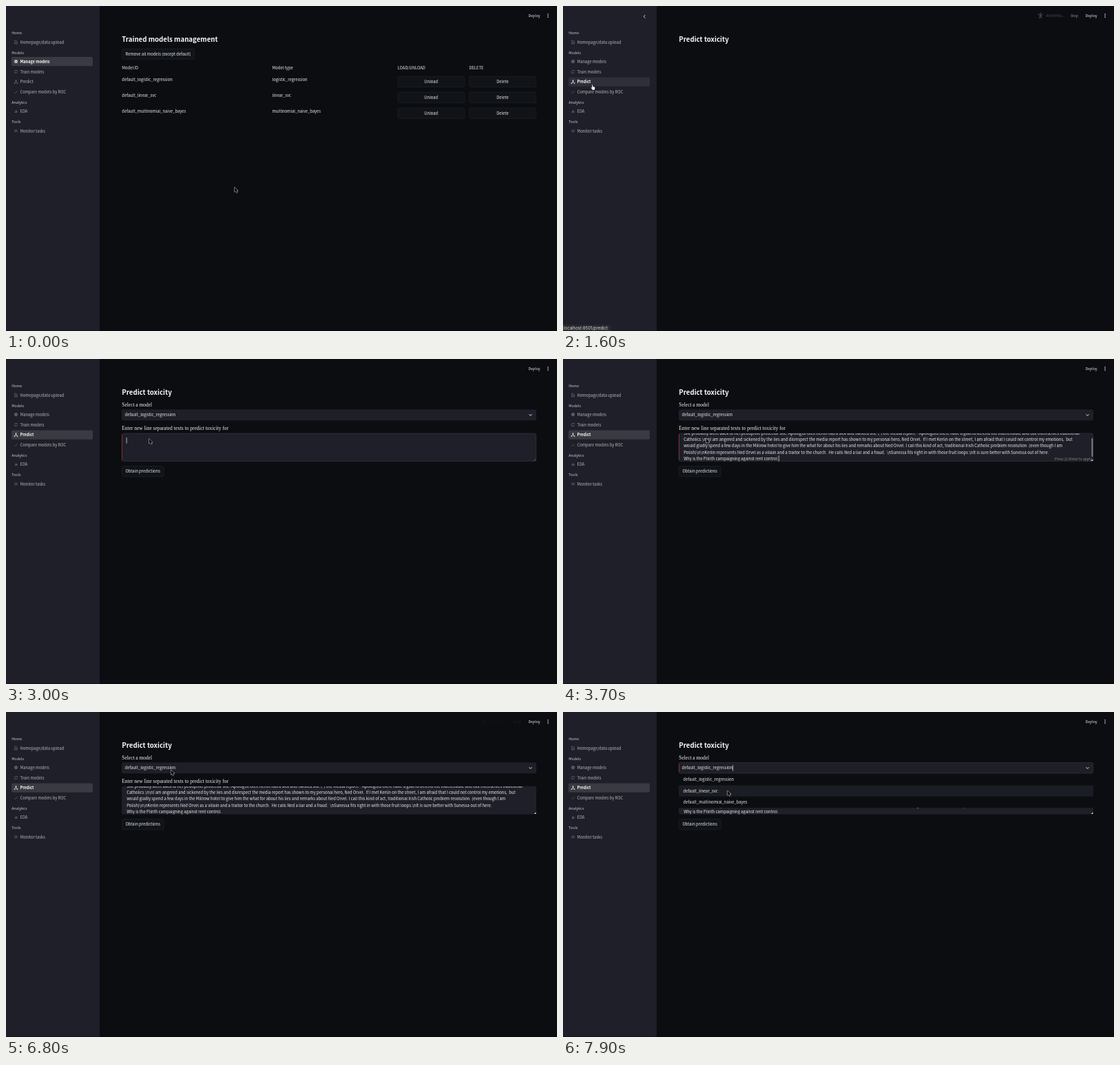
Animation of 800x472 px, one loop 8 s. Source, as an HTML page with a canvas:

```html
<!DOCTYPE html>
<html lang="en">
<head>
<meta charset="utf-8">
<title>Model dashboard</title>
<style>
html, body { margin: 0; width: 100%; height: 100%; overflow: hidden; background: #0c0d11; }
canvas { display: block; width: 800px; height: 472px; }
</style>
</head>
<body>
<canvas id="stage"></canvas>
<script>
const LOOP = 8000, STEP = 100;
const SANS = '"Noto Sans CJK JP", "Noto Sans CJK SC", "Noto Sans CJK", "Open Sans", sans-serif';
const SERIF = '"Liberation Serif", serif';
const UI = 'Inter, sans-serif';
const C = {
  page: '#0c0d11', side: '#1e1f28', field: '#1e1f28', text: '#f2f2f4',
  soft: '#b8b9bf', button: '#101318', edge: '#22252b', red: '#dd3f43'
};

const canvas = document.getElementById('stage');
const dpr = window.devicePixelRatio || 1;
canvas.width = 800 * dpr;
canvas.height = 472 * dpr;
const ctx = canvas.getContext('2d');

// Fonts are set ten times larger and scaled down to keep exact advances.
function label(str, x, y, o = {}) {
  const { size = 5.83, weight = 400, font = SANS, color = C.text, align = 'left' } = o;
  ctx.save();
  ctx.translate(x, y);
  ctx.scale(0.1, 0.1);
  ctx.font = `${weight} ${size * 10}px ${font}`;
  ctx.textAlign = align;
  ctx.fillStyle = color;
  ctx.fillText(str, 0, 0);
  const width = ctx.measureText(str).width / 10;
  ctx.restore();
  return width;
}

function rect(x, y, w, h, color) {
  ctx.fillStyle = color;
  ctx.fillRect(x, y, w, h);
}

function box(x, y, w, h, r, fill, stroke, line = 0.6) {
  ctx.beginPath();
  ctx.roundRect(x, y, w, h, r);
  if (fill) { ctx.fillStyle = fill; ctx.fill(); }
  if (stroke) { ctx.strokeStyle = stroke; ctx.lineWidth = line; ctx.stroke(); }
}

function path(points, color, width, close) {
  ctx.beginPath();
  points.forEach(([x, y]) => ctx.lineTo(x, y));
  if (close) ctx.closePath();
  ctx.strokeStyle = color;
  ctx.lineWidth = width;
  ctx.stroke();
}

function dot(x, y, r, color) {
  ctx.beginPath();
  ctx.arc(x, y, r, 0, Math.PI * 2);
  ctx.fillStyle = color;
  ctx.fill();
}

function ring(x, y, r, color, width, from = 0, to = Math.PI * 2) {
  ctx.beginPath();
  ctx.arc(x, y, r, from, to);
  ctx.strokeStyle = color;
  ctx.lineWidth = width;
  ctx.stroke();
}

function button(str, x, y, w, h, hot) {
  box(x + 0.3, y + 0.3, w - 0.6, h - 0.6, 2.5, C.button, hot ? '#6e3539' : C.edge);
  label(str, x + w / 2, y + h / 2 + 2.1, { align: 'center', color: hot ? C.red : C.text });
}

// Pointer position keys: time, x, y
const MOVES = [
  [0, 332, 263], [100, 332, 258.5], [400, 332, 258.5], [500, 322, 247], [700, 240, 192],
  [900, 128, 138], [1100, 62, 119], [1300, 41, 114], [1700, 41, 114], [1800, 43, 122],
  [1900, 52, 138], [2000, 92, 156], [2100, 211, 180], [2200, 221, 150], [2300, 214, 132],
  [2400, 211, 126], [2700, 208.5, 118], [3100, 207.8, 115], [3800, 207.8, 115],
  [4000, 208.5, 121], [4300, 212, 149], [4500, 214.5, 160], [4700, 215, 163],
  [4900, 215.5, 163], [6100, 215.5, 163], [6300, 220, 152], [6500, 231, 114],
  [6700, 239, 87], [6800, 239.5, 84], [7000, 240, 80], [7300, 240, 81],
  [7500, 240, 98], [7700, 239.5, 110], [7900, 239, 114]
];

function pointerAt(t) {
  const i = MOVES.findIndex(m => m[0] > t);
  if (i < 0) return MOVES[MOVES.length - 1].slice(1);
  const a = MOVES[i - 1], b = MOVES[i], k = (t - a[0]) / (b[0] - a[0]);
  return [a[1] + (b[1] - a[1]) * k, a[2] + (b[2] - a[2]) * k];
}

function drawArrow(x, y) {
  ctx.save();
  ctx.translate(x, y);
  ctx.lineJoin = 'round';
  const shape = [[0, 0], [0, 7.2], [1.7, 5.7], [2.8, 8.2], [4, 7.7], [2.9, 5.2], [5, 5.2]];
  path(shape, '#e8e8ea', 0.9, true);
  ctx.fillStyle = '#08080a';
  ctx.fill();
  ctx.restore();
}

function drawHand(x, y) {
  ctx.save();
  ctx.translate(x, y);
  ctx.lineJoin = 'round';
  path([[1, 0.5], [1.9, 0.3], [2.4, 3], [4.3, 3.4], [5.4, 4.2], [5.3, 6.2], [4.6, 8],
        [2, 8], [0.9, 6.4], [-0.7, 4.6], [0, 4.1], [1.2, 4.9]], '#0a0a0c', 0.8, true);
  ctx.fillStyle = '#f4f4f6';
  ctx.fill();
  ctx.restore();
}

const ICONS = {
  doc(y, c) {
    path([[12.6, y - 2.4], [15, y - 2.4], [16.4, y - 1], [16.4, y + 2.4], [12.6, y + 2.4]], c, 0.6, true);
    path([[13.5, y + 0.2], [15.5, y + 0.2]], c, 0.5);
    path([[13.5, y + 1.3], [15.5, y + 1.3]], c, 0.5);
  },
  gear(y, c) {
    ring(14.5, y, 1.5, c, 1.2);
    for (let i = 0; i < 8; i++) {
      const a = i * Math.PI / 4;
      dot(14.5 + 2.2 * Math.cos(a), y + 2.2 * Math.sin(a), 0.5, c);
    }
  },
  cycle(y, c) {
    ring(14.5, y, 2.1, c, 0.7, 0.3, 2.6);
    ring(14.5, y, 2.1, c, 0.7, 3.2, 5.7);
    dot(16.4, y - 1.3, 0.6, c);
    dot(12.6, y + 1.2, 0.6, c);
  },
  hub(y, c) {
    for (const [dx, dy] of [[0, -2], [-2, 1.8], [2, 1.8]]) {
      path([[14.5, y], [14.5 + dx, y + dy]], c, 0.6);
      dot(14.5 + dx, y + dy, 0.85, c);
    }
    dot(14.5, y, 0.8, c);
  },
  curve(y, c) { path([[12.4, y + 0.8], [13.6, y + 1.4], [16.6, y - 1.8]], c, 0.6); },
  bars(y, c) {
    [1.6, 3.6, 2.6].forEach((h, i) => rect(12.7 + i * 1.4, y + 1.9 - h, 0.8, h, c));
  },
  list(y, c) {
    for (const d of [-1.3, 0, 1.3]) path([[12.2, y + d], [16.8, y + d]], c, 0.5);
  }
};

const SECTIONS = [['Home', 39.3], ['Models', 67.5], ['Analytics', 139.7], ['Tools', 168]];
const PAGES = [
  ['Homepage/data upload', 52.5, 'doc'], ['Manage models', 80.6, 'gear'],
  ['Train models', 95.5, 'cycle'], ['Predict', 110.2, 'hub'],
  ['Compare models by ROC', 125, 'curve'], ['EDA', 153, 'bars'], ['Monitor tasks', 181.4, 'list']
];

function drawSidebar(t, px, py) {
  rect(0, 0, 136, 472, C.side);
  SECTIONS.forEach(([s, y]) => label(s, 8.2, y + 2, { size: 5.3, weight: 500, color: '#d0d1d5' }));
  const active = t < 1500 ? 1 : 3;
  const inside = t >= 900 && t < 2100;
  PAGES.forEach(([s, y, icon], i) => {
    const on = i === active;
    const hover = inside && px < 126 && Math.abs(py - y) < 7;
    if (on) box(8, y - 6.6, 118, 13.2, 2, hover || (inside && t >= 1500 && t < 1900) ? '#302f39' : '#393a42');
    else if (hover) box(8, y - 6.6, 118, 13.2, 2, '#282932');
    ICONS[icon](y, on ? '#f2f2f4' : '#74757c');
    label(s, 20.5, y + 2.1, on
      ? { weight: 700, size: 5.6, color: '#ffffff' }
      : { color: C.soft, size: 5.78 });
  });
  if (inside) path([[119.3, 13], [117.3, 15.3], [119.3, 17.6]], '#e4e4e8', 0.9);
}

function drawRunning(alpha) {
  ctx.save();
  ctx.globalAlpha = alpha;
  const c = '#4a4b51';
  dot(693.3, 10.6, 1, c);
  path([[689.8, 11.8], [692, 13], [694.6, 13], [696.8, 11.8]], c, 1.1);
  path([[693.3, 12.5], [693.3, 15]], c, 2);
  path([[691.6, 18], [692.7, 14.8], [694, 14.8], [695, 18]], c, 1.1);
  label('RUNNING...', 701.5, 15.8, { size: 5.15, color: c });
  label('Stop', 737, 15.9, { size: 5.05, color: '#9a9ba0' });
  ctx.restore();
}

function drawTopBar(t) {
  if (t >= 1500 && t < 1900) drawRunning(1);
  if (t >= 6700 && t < 7000) drawRunning(0.12);
  label('Deploy', 758.5, 16, { size: 5.2, weight: 500 });
  for (const d of [-2.2, 0, 2.2]) dot(787, 14 + d, 0.75, '#e6e6ea');
}

const heading = s => label(s, 168.2, 51.8, { size: 9.7, weight: 700, color: '#fafafa' });

const MODELS = ['logistic_regression', 'linear_svc', 'multinomial_naive_bayes'];

function drawManage() {
  heading('Trained models management');
  button('Remove all models (except default)', 168, 62, 106, 15.6);
  [['Model ID', 168.3], ['Model type', 386.6], ['LOAD/UNLOAD', 568.6], ['DELETE', 672.4]]
    .forEach(([s, x]) => label(s, x, 91.8));
  MODELS.forEach((m, i) => {
    const y = i * 22.9;
    label('default_' + m, 168.3, 108.9 + y);
    label(m, 386.6, 108.9 + y);
    button('Unload', 568.5, 102 + y, 97.5, 16);
    button('Delete', 672.3, 102 + y, 97.5, 16);
  });
}

const PASTED = [
  'She probably went back to her pedophile protector site. Apologist Glen Kerlin has a sick and twisted site \\"( the media report."  Apologists there have a goal to defend the indefensible and call themselves traditional',
  'Catholics.\\n\\nI am angered and sickened by the lies and disrespect the media report has shown to my personal hero, Ned Orvel.  If I met Kerlin on the street, I am afraid that I could not control my emotions,  but',
  'would gladly spend a few days in the Millrow hotel to give him the what for about his lies and remarks about Ned Orvel. I call this kind of act, traditional Irish Catholic problem resolution. (even though I am',
  'Polish)\\n\\nKerlin represents Ned Orvel as a villain and a traitor to the church.  He calls Ned a liar and a fraud.  \\nSunessa fits right in with those fruit loops.\\nIt is sure better with Sunessa out of here.',
  'Why is the Plinth campaigning against rent control.'
];

function focusEdge(x, y, w, h) {
  box(x + 0.3, y + 0.3, w - 0.6, h - 0.6, 2.5, null, '#34343c', 0.6);
  rect(x, y + 2, 0.7, h - 4, '#a8343a');
}

const caret = (x, y) => rect(x, y, 0.7, 8.6, '#f0f0f2');
const within = (t, spans) => spans.some(([a, b]) => t >= a && t < b);

function drawTextArea(t) {
  const focused = t >= 2600 && t < 6200, filled = t >= 3700;
  box(168, 107.8, 602, 40.9, 2.5, C.field);
  if (focused) focusEdge(168, 107.8, 602, 40.9);
  let caretX = 174.7, caretY = 114;
  if (filled) {
    ctx.save();
    ctx.beginPath();
    ctx.rect(168, 108, 602, 40.5);
    ctx.clip();
    PASTED.forEach((s, i) => {
      caretX = 175.2 + label(s, 175.2, 109.9 + i * 9.2);
    });
    ctx.restore();
    caretY = 140.2;
    if (focused) label('Press ⌘+Enter to apply', 768, 146.5, { size: 5, color: '#8d8e94', align: 'right' });
    const bar = t < 3900 ? 1 : Math.max(0, 1 - (t - 3800) / 400);
    if (bar) box(767.4, 115, 2, 27, 1, `rgba(125,126,131,${bar})`);
  }
  if (within(t, [[2600, 3100], [3500, 5100], [5600, 6100]])) caret(caretX, caretY);
  if (filled) {
    ctx.beginPath();
    ctx.moveTo(769.4, 145.4);
    ctx.lineTo(769.4, 148);
    ctx.lineTo(766.8, 148);
    ctx.fillStyle = '#e8e8ea';
    ctx.fill();
  } else {
    path([[766, 148], [769.2, 144.8]], '#77787e', 0.5);
    path([[767.8, 148], [769.2, 146.6]], '#77787e', 0.5);
  }
}

function drawSelect(open, t) {
  box(168, 73.2, 602, 16, 2.5, C.field);
  if (open) focusEdge(168, 73.2, 602, 16);
  const w = label('default_' + MODELS[0], 172.6, 83.3);
  if (open && within(t, [[6900, 7400], [7900, 8000]])) caret(172.9 + w, 77);
  path([[759.6, 80.3], [761.5, 82.3], [763.4, 80.3]], '#ececf0', 1);
}

function drawMenu(py) {
  box(168, 90, 602, 49.2, 2, C.page);
  const hot = py > 105.5 ? 1 : 0;
  rect(168, 90.2 + hot * 16.3, 602, 16.2, '#1b1d25');
  MODELS.forEach((m, i) => label('default_' + m, 174.6, 100.3 + i * 16.4));
}

function drawPredict(t, px, py) {
  heading('Predict toxicity');
  if (t < 1800) return;
  const open = t >= 6900;
  const serif = { font: SERIF, size: 7.45 };
  label('Select a model', 168.3, 68.7, serif);
  drawSelect(open, t);
  label('Enter new line separated texts to predict toxicity for', 168.3, 102.8, serif);
  drawTextArea(t);
  const hot = t >= 2400 && px > 168 && px < 229 && py > 155 && py < 171;
  button('Obtain predictions', 168, 155.2, 61.4, 16, hot);
  if (open) drawMenu(py);
}

function drawStatus(t) {
  if (t < 1500 || t >= 2300) return;
  const eda = t >= 2000;
  box(-3, 463, eda ? 62 : 72, 12, 2, '#2a2b2e');
  label('localhost:8501/' + (eda ? 'eda' : 'predict'), 1, 470, { font: UI, size: 6.1, color: '#dcdce0' });
}

function draw(t) {
  const [px, py] = pointerAt(t);
  ctx.setTransform(dpr, 0, 0, dpr, 0, 0);
  rect(0, 0, 800, 472, C.page);
  if (t < 1600) drawManage();
  else drawPredict(t, px, py);
  drawSidebar(t, px, py);
  drawTopBar(t);
  rect(0, 471, 800, 1, 'rgba(0,0,0,0.35)');
  drawStatus(t);
  if (t >= 1000 && t < 2100) drawHand(px, py);
  else drawArrow(px, py);
}

const start = performance.now();
function tick() {
  const t = (performance.now() - start) % LOOP;
  draw(Math.floor(t / STEP) * STEP);
  requestAnimationFrame(tick);
}
tick();
</script>
</body>
</html>
```
